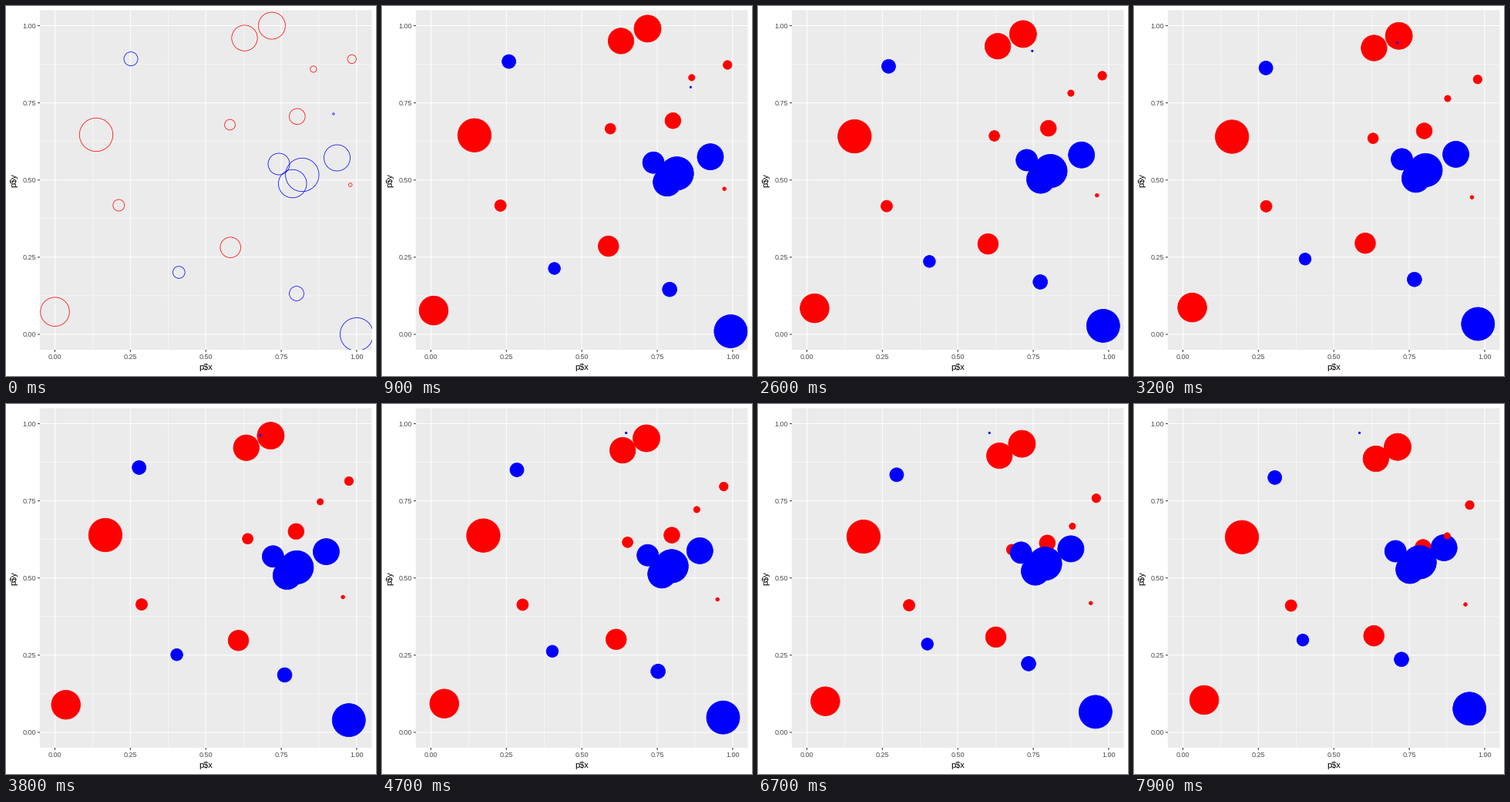
Write a matplotlib script that moves like this. It is 480 px wide and 480 px high and loops after 8 s.

```python
import numpy as np
import matplotlib.pyplot as plt
from matplotlib.animation import FuncAnimation
from matplotlib.patches import Circle, Rectangle

SIZE, DPI = 480, 80
PX = 72 / DPI                      # one pixel in points
FRAMES, STEP = 80, 100
LEFT, RIGHT, TOP, BOTTOM = 43.9, 474.5, 5.5, 446.0
RED, BLUE = "#ff0000", "#0000ff"
DRAG = 0.14                        # shared slowing of every drift

plt.rcParams["font.family"] = "Liberation Sans"
fig = plt.figure(figsize=(SIZE / DPI, SIZE / DPI), dpi=DPI, facecolor="white")
ax = fig.add_axes([0, 0, 1, 1])
ax.set_xlim(0, SIZE)
ax.set_ylim(SIZE, 0)
ax.axis("off")


def data_x(v):
    return LEFT + (RIGHT - LEFT) * (1 + 20 * v) / 22


def data_y(v):
    return BOTTOM - (BOTTOM - TOP) * (1 + 20 * v) / 22


def line(xs, ys, color, width, z):
    ax.plot(xs, ys, color=color, lw=width * PX, zorder=z,
            solid_capstyle="butt", snap=False)


def label(x, y, text, size=9, color="#4d4d4d", ha="center", **kw):
    ax.text(x, y, text, fontsize=size * PX, color=color, ha=ha,
            va="baseline", parse_math=False, **kw)


panel = ax.add_patch(Rectangle((LEFT, TOP), RIGHT - LEFT, BOTTOM - TOP,
                               fc="#ebebeb", lw=0, zorder=0, snap=False))

for v in np.arange(0, 1.01, 0.125):
    major = v % 0.25 == 0
    x, y = data_x(v), data_y(v)
    width = 1.07 if major else 0.53
    line([x, x], [TOP, BOTTOM], "white", width, 1 + major)
    line([LEFT, RIGHT], [y, y], "white", width, 1 + major)
    if major:
        line([x, x], [BOTTOM, BOTTOM + 2.75], "#333333", 1.07, 3)
        line([LEFT - 2.75, LEFT], [y, y], "#333333", 1.07, 3)
        label(x, 458, f"{v:.2f}")
        label(39, y + 3.2, f"{v:.2f}", ha="right")

label((LEFT + RIGHT) / 2, 472, "p$x", 11, "black")
label(13.3, (TOP + BOTTOM) / 2, "p$y", 11, "black",
      rotation=90, rotation_mode="anchor")

bodies = []


def add_body(color, radius, path):
    dot = Circle((0, 0), radius, ec=color, fc="none", lw=0.75 * PX,
                 zorder=5 + 0.01 * len(bodies))
    ax.add_patch(dot)
    dot.set_clip_path(panel)
    bodies.append((dot, color, path))


def drift(color, radius, start, end, bow=(0, 0)):
    """Slowing drift from start to end, bowed aside by its neighbours."""
    p, q, b = map(np.array, (start, end, bow))

    def path(u):
        arc = u * (1 - u)
        return p + (q - p) * (u + DRAG * arc) + 4 * b * arc

    add_body(color, radius, path)


def fling(u):
    """Fast sweep up and left that breaks into a slow glide."""
    t = u * (FRAMES - 1) * STEP / 1000
    x = 341.5 - 6.2 * t + 14.76 * np.logaddexp(0, (3.95 - t) / 0.7)
    y = 37.5 + 102.5 * max(0, 1 - t / 4.5) ** 1.85
    return x, y


drift(RED, 21.7, (117, 167), (140, 172.8))
drift(RED, 18.8, (63.5, 396.7), (91, 384))
drift(RED, 7.5, (146.3, 258.5), (203.7, 261.5))
drift(RED, 13.3, (291.2, 313.2), (311.2, 300.7))
drift(RED, 6.9, (290.5, 154), (335.2, 194.3))
drift(RED, 16.7, (309.5, 41.6), (313.8, 71))
drift(RED, 17.5, (344.9, 25.5), (342, 55.7))
drift(RED, 10.3, (377.8, 143.3), (374.9, 186))
drift(RED, 5.7, (448.7, 68.9), (435.5, 131.1), (3, -1))
drift(RED, 2.3, (446.7, 232), (430, 260), (-1, 4))
drift(BLUE, 9.0, (162, 68.6), (182.7, 95.4))
drift(BLUE, 7.8, (224.3, 345.5), (219, 306.2))
drift(BLUE, 9.4, (377, 373), (347, 331.3))
drift(BLUE, 21.5, (454.9, 425.9), (435.2, 395.3))
drift(BLUE, 17.0, (429.5, 197), (402.2, 186.5))
drift(BLUE, 14.0, (354, 205), (339.2, 191))
drift(BLUE, 18.3, (371.7, 230.5), (357.9, 214.7))
drift(BLUE, 21.7, (384.3, 219), (370.6, 205.3))
drift(RED, 4.1, (398.8, 81.9), (406.3, 171), (5, -1))
add_body(BLUE, 1.2, fling)


def update(i):
    for dot, color, path in bodies:
        dot.center = path(i / (FRAMES - 1))
        # hollow only in the opening pose
        dot.set_facecolor(color if i else "none")
    return [b[0] for b in bodies]


anim = FuncAnimation(fig, update, frames=FRAMES, interval=STEP,
                     repeat=True, repeat_delay=0, blit=False)
plt.show()
```
